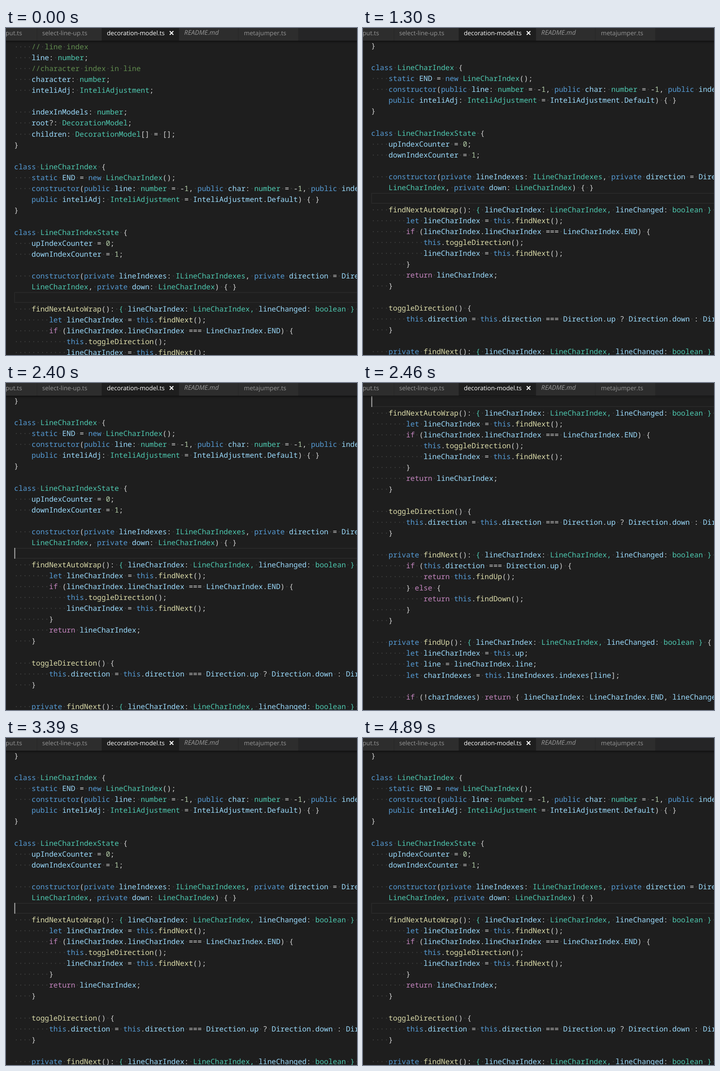
An HTML page for the animation above (5110 ms loop, 776 px wide and 722 px high).

```html
<!DOCTYPE html>
<html lang="en">
<head>
<meta charset="utf-8">
<title>Editor scroll</title>
<style>
  html, body { margin: 0; width: 100%; height: 100%; overflow: hidden; background: #1e1e1e; }
  #tabs { position: absolute; inset: 0 0 auto; height: 28px; overflow: hidden; background: #252526;
    font: 13.6px/21px "Open Sans", "Noto Sans", sans-serif; text-rendering: geometricPrecision; color: #969696; }
  .tab { position: absolute; height: 28px; background: #2d2d2d; white-space: pre; box-sizing: border-box; }
  .active { background: #1e1e1e; color: #fff; }
  .preview { font-style: italic; font-size: 14.3px; }
  #tabs svg { position: absolute; left: 361px; top: 6px; stroke: #fff; stroke-width: 2.2; }
  #editor { position: absolute; inset: 28px 0 0; overflow: hidden; }
  #shadow { position: absolute; inset: 0 0 auto; height: 6px; box-shadow: #000 0 6px 6px -6px inset; }
  #page { position: absolute; left: 18px; width: 900px; }
  #code { position: absolute; margin: 0; tab-size: 4; color: #d4d4d4;
    font: 500 16.08px/24.125px "Noto Sans Mono", "DejaVu Sans Mono", monospace;
    text-rendering: geometricPrecision; font-variant-ligatures: none; }
  #line, #cursor { position: absolute; top: 554.8px; height: 24px; box-sizing: border-box; }
  #line { width: 900px; border: 2px solid #282828; }
  #cursor { width: 3px; background: linear-gradient(90deg, #777 1px, #aeafad 1px 2px, #555 2px); }
  .space { color: rgba(227, 228, 226, .2); }
  .comment { color: #608b4e; }
  .keyword { color: #569cd6; }
  .control { color: #c586c0; }
  .type { color: #4ec9b0; }
  .call { color: #dcdcaa; }
  .digit { color: #b5cea8; }
  .name { color: #9cdcfe; }
</style>
</head>
<body>
<div id="editor">
  <div id="page"><div id="line"></div><pre id="code"></pre><div id="cursor"></div></div>
  <div id="shadow"></div>
</div>
<div id="tabs">
  <div class="tab" style="left:0;width:68px;text-indent:-1px">put.ts</div>
  <div class="tab" style="left:69px;width:142px;padding-left:11px">select-line-up.ts</div>
  <div class="tab active" style="left:212px;width:170px;padding-left:11px">decoration-model.ts</div>
  <div class="tab preview" style="left:383px;width:130px;padding-left:11px">README.md</div>
  <div class="tab" style="left:514px;width:132px;padding-left:12px">metajumper.ts</div>
  <svg width="10" height="10"><path d="M1 1L9 9M9 1L1 9"/></svg>
</div>
<script>
// A leading tab marks a soft-wrapped row, which shows no whitespace dots.
const source = `    // line index
    line: number;
    //character index in line
    character: number;
    inteliAdj: InteliAdjustment;

    indexInModels: number;
    root?: DecorationModel;
    children: DecorationModel[] = [];
}

class LineCharIndex {
    static END = new LineCharIndex();
    constructor(public line: number = -1, public char: number = -1, public index
\tpublic inteliAdj: InteliAdjustment = InteliAdjustment.Default) { }
}

class LineCharIndexState {
    upIndexCounter = 0;
    downIndexCounter = 1;

    constructor(private lineIndexes: ILineCharIndexes, private direction = Direct
\tLineCharIndex, private down: LineCharIndex) { }

    findNextAutoWrap(): { lineCharIndex: LineCharIndex, lineChanged: boolean } {
        let lineCharIndex = this.findNext();
        if (lineCharIndex.lineCharIndex === LineCharIndex.END) {
            this.toggleDirection();
            lineCharIndex = this.findNext();
        }
        return lineCharIndex;
    }

    toggleDirection() {
        this.direction = this.direction === Direction.up ? Direction.down : Direct
    }

    private findNext(): { lineCharIndex: LineCharIndex, lineChanged: boolean } {
        if (this.direction === Direction.up) {
            return this.findUp();
        } else {
            return this.findDown();
        }
    }

    private findUp(): { lineCharIndex: LineCharIndex, lineChanged: boolean } {
        let lineCharIndex = this.up;
        let line = lineCharIndex.line;
        let charIndexes = this.lineIndexes.indexes[line];

        if (!charIndexes) return { lineCharIndex: LineCharIndex.END, lineChanged
`;

const rules = {
  comment: /\/\/.*/,
  space: / +/,
  keyword: /\b(?:class|static|new|constructor|public|private|let|this)\b/,
  control: /\b(?:if|else|return)\b/,
  type: /\b(?:number|boolean)\b|(?<=\S: |new |class )[A-Z]\w*\b(?!\.)|\bLineCharIndex(?=,)|(?<=\): )\{|,(?= lineChanged: )|(?<=boolean )\}/,
  call: /\b\w+(?=\()/,
  digit: /\b\d+/,
  name: /\b\w+/
};
const tokens = new RegExp(
  Object.entries(rules).map(([kind, rule]) => `(?<${kind}>${rule.source})`).join('|'), 'g');
const span = (kind, text) => `<span class="${kind}">${text}</span>`;
const dots = text => text.replace(/ +/g, run => span('space', '·'.repeat(run.length)));

const byId = id => document.getElementById(id);
byId('code').innerHTML = source.replace(tokens, (text, ...rest) => {
  const kind = Object.entries(rest.at(-1)).find(([, match]) => match !== undefined)[0];
  return span(kind, dots(text));
});

const LOOP = 5110;
const scrolls = [[0, 0], [1300, 219], [2460, 554], [3390, 219]];
const blinks = [390, 920, 1390, 1940, 2400, 2860, 3390, 3870, 4430, 4890];

function draw() {
  const time = performance.now() % LOOP;
  const scroll = scrolls.findLast(([start]) => time >= start)[1];
  const toggles = blinks.filter(start => time >= start).length;
  byId('page').style.top = `${0.5 - scroll}px`;
  byId('cursor').style.visibility = toggles % 2 ? 'visible' : 'hidden';
  requestAnimationFrame(draw);
}
draw();
</script>
</body>
</html>
```
